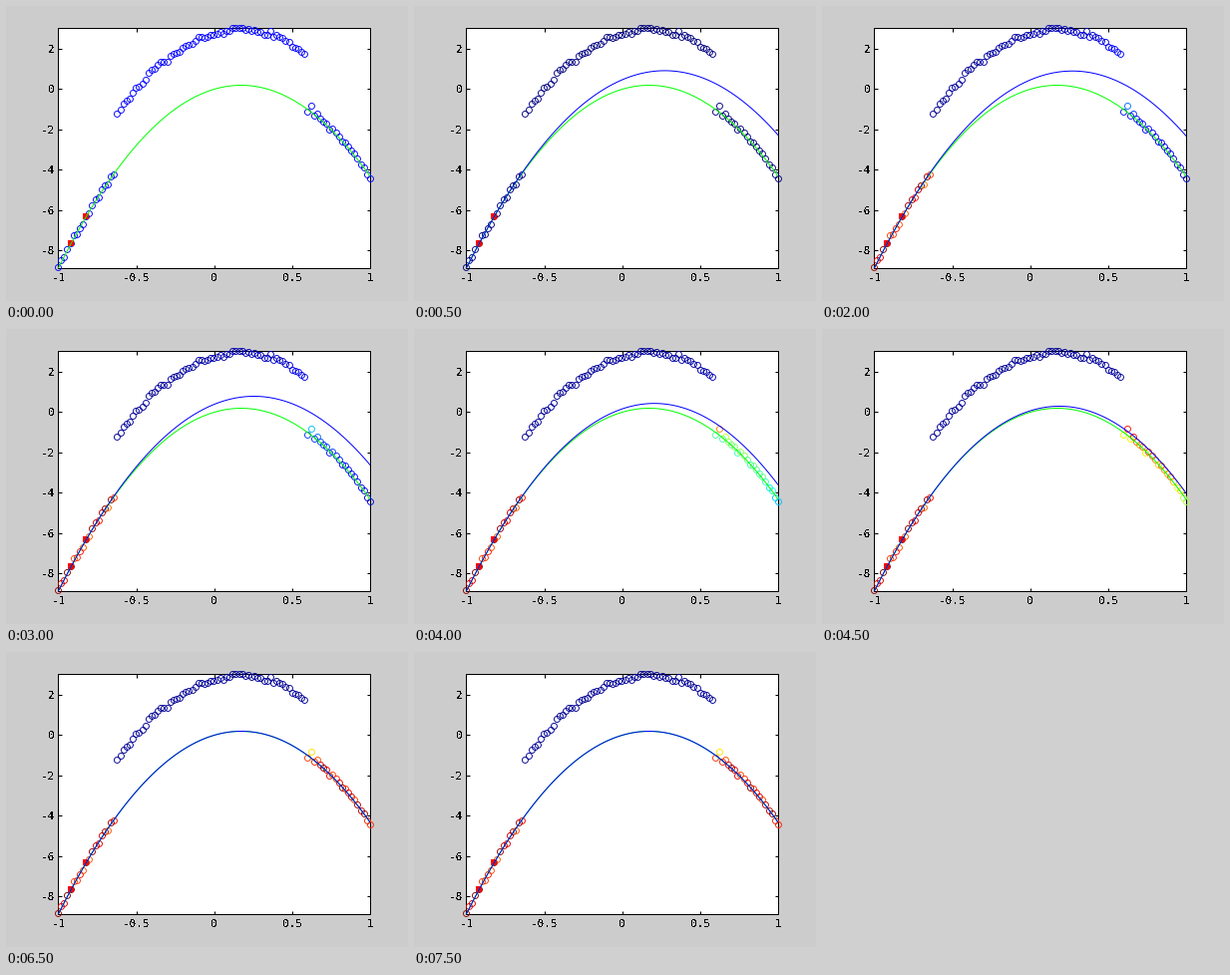
A matplotlib script for the animation above (8 s loop, 403 px wide and 296 px high).

```python
import numpy as np
import matplotlib.pyplot as plt
from matplotlib.animation import FuncAnimation

W, H, DPI = 403, 296, 100
PX = 72 / DPI
LEFT, RIGHT, TOP, BOTTOM = 52.45, 365.45, 22.45, 263.45
YMIN, YMAX = -8.889, 3.012
FRAMES, STEP = 16, 500

plt.rcParams.update({
    "font.family": "DejaVu Sans Mono",
    "font.size": 11 * PX,
    "text.antialiased": False,
    "axes.unicode_minus": False,
})


def to_pixel_grid(v, start, scale):
    return start + np.round((v - start) * scale) / scale


# Noisy samples of a parabola; the middle block is shifted up as outliers
x = np.linspace(-1, 1, 101)
truth = 2.26 * x - 6.61 * x ** 2
seeds = [4, 9]
stray = 81
noise = np.random.RandomState(3).uniform(-.15, .15, x.size)
noise[seeds] = 0
noise[stray] = .28
y = truth + noise + 2.75 * (np.abs(x + .015) < .61)

dot_x = to_pixel_grid(x, -1, (RIGHT - LEFT) / 2)
dot_y = to_pixel_grid(y, YMIN, (BOTTOM - TOP) / (YMAX - YMIN))


def fit(i):
    """The fit holds, then slides onto the true curve along a logistic."""
    gap = 2.05 / (1 + np.exp((i - 7.45) / .9))
    return truth + gap * (x + 1) * (x + .85) / 3.7


def weights(i):
    """Only the seeds count at first, later every sample near the fit."""
    if i == 1:
        return np.isin(np.arange(x.size), seeds).astype(float)
    return np.exp(-np.abs(y - fit(i)) / .7)


fig = plt.figure(figsize=(W / DPI, H / DPI), dpi=DPI, facecolor="#cccccc")
ax = fig.add_axes([LEFT / W, 1 - BOTTOM / H,
                   (RIGHT - LEFT) / W, (BOTTOM - TOP) / H])
ax.set(xlim=(-1, 1), ylim=(YMIN, YMAX),
       xticks=[-1, -.5, 0, .5, 1], yticks=range(-8, 3, 2))
ax.set_xticklabels(["-1", "-0.5", "0", "0.5", "1"])
ax.tick_params(direction="in", top=True, right=True,
               length=3.5 * PX, width=PX, pad=4 * PX)
ax.tick_params(axis="x", pad=5 * PX)
for spine in ax.spines.values():
    spine.set_linewidth(PX)

dots = ax.scatter(dot_x, dot_y, s=(6 * PX) ** 2, facecolors="none",
                  edgecolors="b", linewidths=.9 * PX, clip_on=False, zorder=3)
ax.plot(dot_x[seeds], dot_y[seeds], "s", color="r", ms=6 * PX, mew=0,
        zorder=3.5)
ax.plot(x, truth, color="#00ff00", lw=PX, zorder=4)
curve, = ax.plot([], [], color="b", lw=PX, zorder=5)


def draw(i):
    if i == 0:
        dots.set_edgecolor("b")
        curve.set_data([], [])
    else:
        dots.set_edgecolor(plt.cm.jet(weights(i)))
        curve.set_data(x, fit(i))
    return dots, curve


anim = FuncAnimation(fig, draw, frames=FRAMES, interval=STEP,
                     repeat=True, repeat_delay=0)
plt.show()
```
